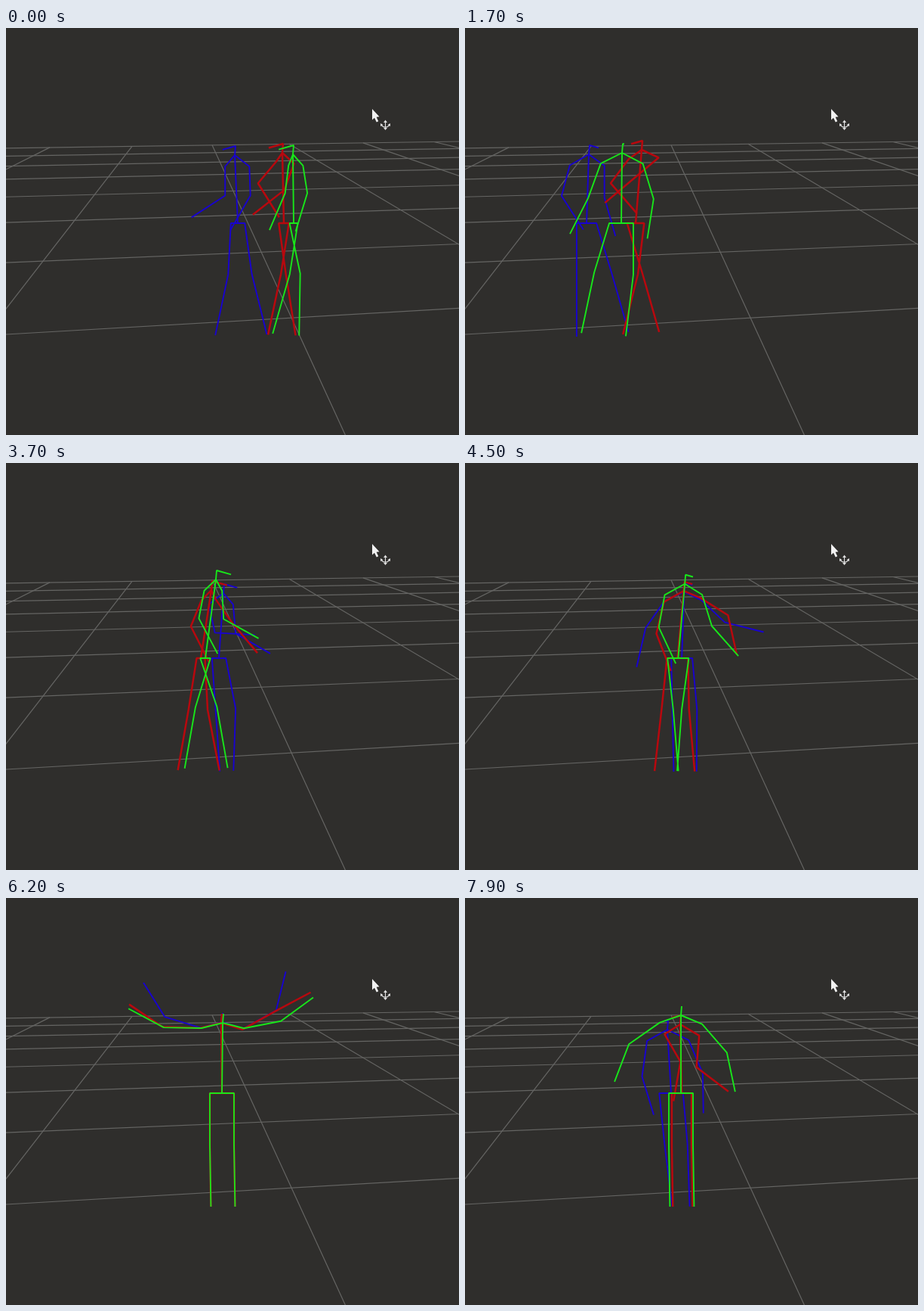
These frames come from a looping animation (600 by 538 pixels, 8000 ms). An HTML page with a canvas:

```html
<!DOCTYPE html>
<html lang="en">
<head>
<meta charset="utf-8">
<title>Walking skeletons</title>
<style>
html, body { margin: 0; width: 100%; height: 100%; overflow: hidden; background: #2f2e2c; }
canvas { display: block; width: 100vw; height: 100vh; }
</style>
</head>
<body>
<canvas id="stage" width="600" height="538"></canvas>
<script>
const ctx = document.getElementById('stage').getContext('2d');
const LOOP = 8000, STEP = 100, HIP_Y = 258;
const rad = deg => deg * Math.PI / 180;

const blue = { color: '#1802d0', width: 1.9, keys: [] };
const red = { color: '#b8080e', width: 2.5, keys: [] };
const green = { color: '#18e61a', width: 1.9, keys: [] };

// Neck point, pelvis x, turn, then [upper, lower] limb angles:
// 0 hangs straight down, positive leans to the right.
function key(who, time, neck, pelvis, yaw, armA, armB, legA = [0, 1], legB = [0, 1]) {
  who.keys.push({ time, pose: [...neck, pelvis, yaw, ...armA, ...armB, ...legA, ...legB] });
}

key(blue, 0, [303, 168], 307, -55, [0, -57], [2, -30], [-3, -12], [8, 14]);
key(blue, 1700, [164, 167], 161, 35, [-15, 33], [0, 16], [0, 0], [17, 16]);
key(blue, 2700, [243, 171], 237, 80, [-37, -13], [37, 92], [-8, -3], [16, 14]);
key(blue, 3700, [288, 172], 282, 55, [12, 87], [5, 60], [4, 4], [11, -2]);
key(blue, 5100, [292, 169], 291, 10, [-70, -88], [78, 88], [0, 0], [0, 0]);

key(red, 0, [366, 165], 368, -65, [-40, 32], [-20, -52], [8, 9], [-9, -12]);
key(red, 1700, [234, 161], 226, -45, [-37, 41], [-50, -50], [17, 16], [-7, -14]);
key(red, 2700, [219, 165], 202, 50, [8, 58], [50, -17], [-10, -9], [-4, 10]);
key(red, 3700, [272, 168], 258, 70, [-22, 27], [35, 40], [-9, -10], [3, 11]);
key(red, 5100, [303, 170], 299, 0, [-7, 17], [75, -8], [0, 0], [-4, -3]);

key(green, 0, [380, 167], 381, -70, [-7, -23], [9, -17], [12, -1], [-9, -16]);
key(green, 1700, [208, 165], 207, 5, [-20, -27], [17, -9], [-17, -12], [0, -7]);
key(green, 2700, [218, 161], 203, 60, [6, 58], [-19, 40], [-4, -20], [3, 8]);
key(green, 3700, [278, 154], 264, 65, [-11, 28], [3, 61], [19, 10], [-17, -10]);
key(green, 5100, [301, 164], 296, 0, [-10, 23], [28, 27], [0, 4], [-4, -3]);

key(blue, 6200, [286, 164], 286, 0, [-107, -148], [119, 166]);
key(red, 6200, [285, 165], 286, 0, [-92, -124], [119, 118]);
key(green, 6200, [287, 165], 286, 0, [-91, -118], [101, 126]);

// The wing beat peaks in turn, then sinks through level
[blue, red, green].forEach((who, i) => {
  const peak = 6300 + 400 * i;
  key(who, peak, [286, 164], 286, 0, [-107, -150], [118, 166]);
  key(who, peak + 500, [286, 164], 286, 0, [-85, -75], [85, 75]);
});

key(blue, 7900, [268, 174], 273, -10, [-8, 17], [23, 1], [6, 7], [5, 2]);
key(red, 7900, [285, 167], 287, -35, [30, -10], [-5, 53]);
key(green, 7900, [286, 155], 286, 0, [-55, -21], [41, 12]);

function poseAt({ keys }, t) {
  let i = 0;
  while (i < keys.length - 2 && t >= keys[i + 1].time) i++;
  const a = keys[i], b = keys[i + 1];
  const u = Math.min(1, (t - a.time) / (b.time - a.time));
  const pose = a.pose.map((v, n) => v + (b.pose[n] - v) * u);
  // Stride grows with the distance walked
  const stride = Math.sin(2 * Math.PI * u) * Math.min(12, Math.abs(b.pose[2] - a.pose[2]) / 8);
  pose[8] += stride; pose[9] += stride;
  pose[10] -= stride; pose[11] -= stride;
  return pose;
}

function line(...points) {
  ctx.beginPath();
  points.forEach(([x, y]) => ctx.lineTo(x, y));
  ctx.stroke();
}

// Root, joint and end of a two-bone limb
function limb(x, y, upper, lower, len1, len2) {
  const jx = x + len1 * Math.sin(rad(upper)), jy = y + len1 * Math.cos(rad(upper));
  return [[x, y], [jx, jy], [jx + len2 * Math.sin(rad(lower)), jy + len2 * Math.cos(rad(lower))]];
}

function drawFigure(who, t) {
  const [nx, ny, px, yaw, a1, a2, b1, b2, c1, c2, d1, d2] = poseAt(who, t);
  const side = Math.sin(rad(yaw)), front = Math.cos(rad(yaw));
  const neck = [nx, ny], pelvis = [px, HIP_Y], top = [nx + 1, ny - 12];
  const nose = [top[0] + 21 * side, top[1] + 6 * Math.abs(side)];
  // Shoulders lift along with the arms
  const arm = (dir, upper, lower) => limb(
    nx - 4 * side + dir * 28 * front, ny + 15 - 8 * Math.sin(rad(upper)) ** 2,
    upper, lower, 50 * (1 - 0.28 * Math.abs(side)), 53);
  const leg = (dir, upper, lower) => limb(px + dir * 16 * front, HIP_Y, upper, lower, 68, 82);

  ctx.strokeStyle = who.color;
  ctx.lineWidth = who.width;
  line(nose, top, neck, pelvis);
  line(...arm(-1, a1, a2).reverse(), neck, ...arm(1, b1, b2));
  line(...leg(-1, c1, c2).reverse(), ...leg(1, d1, d2));
}

function drawGrid() {
  const vx = 234, vy = 70;
  ctx.strokeStyle = '#656563';
  ctx.lineWidth = 1.2;
  for (let i = 0; i < 8; i++) {
    line([0, vy + 1 / (0.002985 + 0.00118 * i)], [600, vy + 1 / (0.00333 + 0.00131 * i)]);
  }
  for (const x of [58, 167, 273, 375, 473, 567]) {
    const y = 158.7 - x * 0.0145;
    line([x, y], [vx + (x - vx) * 6, vy + (y - vy) * 6]);
  }
}

function drawCursor() {
  ctx.fillStyle = '#f2f2f2';
  ctx.fill(new Path2D('M485 107V121.5L488 118.8L490.8 124.5L493.2 123.3L490.6 117.8L494.5 117.3Z'));
  ctx.fillStyle = ctx.strokeStyle = '#dedede';
  ctx.lineWidth = 1.2;
  ctx.stroke(new Path2D('M502.5 123V133M497.5 128Q498.5 131 502.5 131T507.5 128'));
  ctx.fill(new Path2D('M502.5 121.5L505 125H500ZM502.5 135L505 132H500ZM496 126L499.5 128L496 130ZM509 126L505.5 128L509 130Z'));
}

function frame() {
  const t = Math.floor(performance.now() / STEP) * STEP % LOOP;
  ctx.fillStyle = '#2f2e2c';
  ctx.fillRect(0, 0, 600, 538);
  ctx.lineJoin = 'bevel';
  drawGrid();
  [blue, red, green].forEach(who => drawFigure(who, t));
  drawCursor();
  requestAnimationFrame(frame);
}
frame();
</script>
</body>
</html>
```
